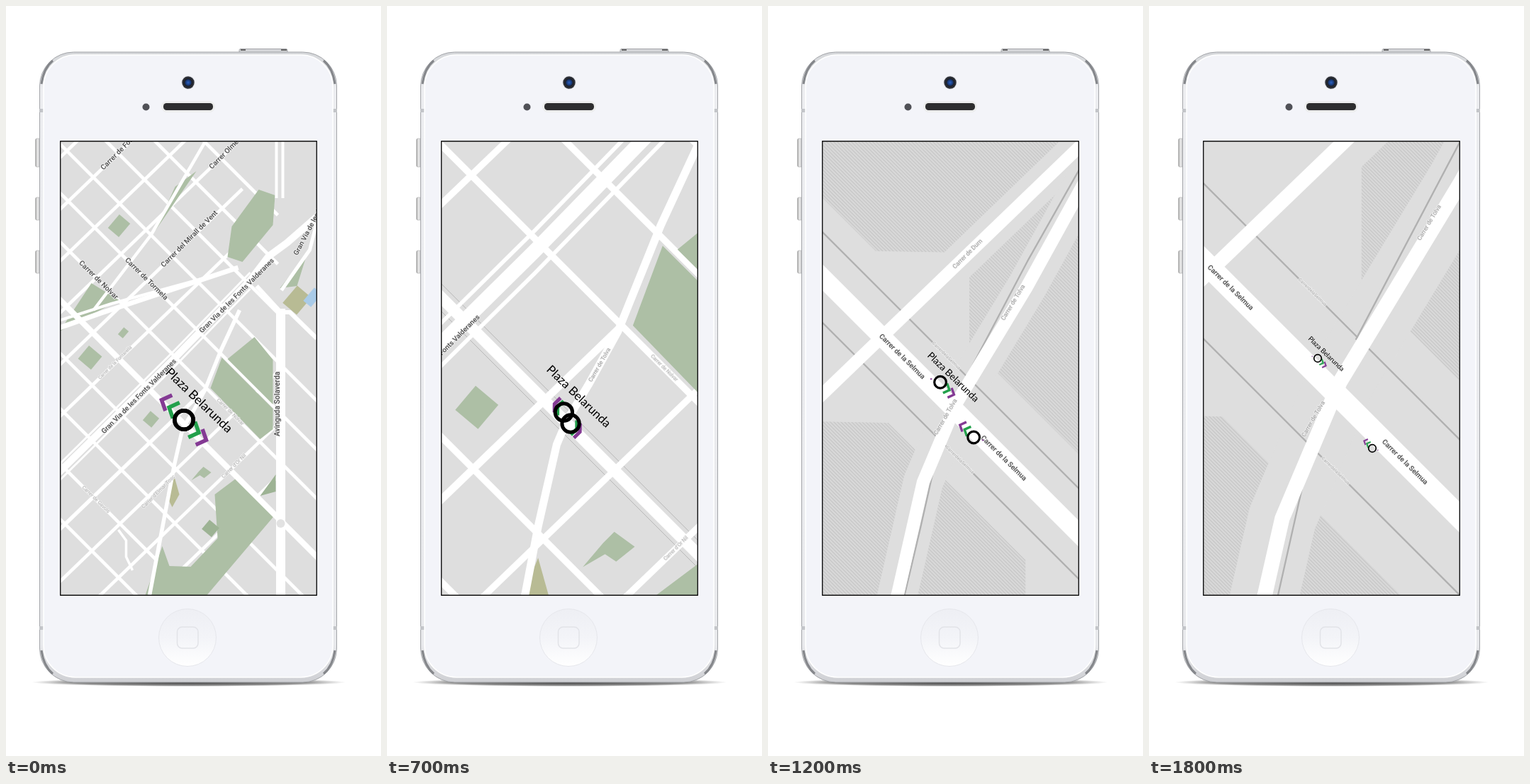
These frames come from a looping animation (529 by 1058 pixels, 1900 ms). An HTML page with a canvas:

```html
<!DOCTYPE html>
<html lang="ca">
<head>
<meta charset="utf-8">
<title>Map zoom</title>
<style>
html, body { margin: 0; width: 100%; height: 100%; overflow: hidden; background: #fff; }
svg, canvas { position: absolute; left: 0; top: 0; }
canvas { left: 76px; top: 190px; }
</style>
</head>
<body>
<svg width="529" height="1058" viewBox="0 0 529 1058">
  <defs>
    <linearGradient id="rim" x2="0" y2="1">
      <stop offset="0" stop-color="#d4d6d9"/><stop offset=".06" stop-color="#ecedf0"/>
      <stop offset=".94" stop-color="#e8e9ec"/><stop offset="1" stop-color="#cfd0d4"/>
    </linearGradient>
    <linearGradient id="key">
      <stop offset="0" stop-color="#999"/><stop offset=".4" stop-color="#eee"/><stop offset="1" stop-color="#b5b5b8"/>
    </linearGradient>
    <linearGradient id="home" x2="0" y2="1">
      <stop offset="0" stop-color="#eeeff4"/><stop offset=".5" stop-color="#f3f4f8"/><stop offset="1" stop-color="#fff"/>
    </linearGradient>
    <radialGradient id="shade">
      <stop offset="0" stop-color="#222" stop-opacity=".9"/><stop offset=".75" stop-color="#333" stop-opacity=".55"/>
      <stop offset="1" stop-color="#555" stop-opacity="0"/>
    </radialGradient>
    <radialGradient id="lens">
      <stop offset="0" stop-color="#2b62c4"/><stop offset=".45" stop-color="#17356f"/>
      <stop offset=".6" stop-color="#1d2029"/><stop offset="1" stop-color="#33363d"/>
    </radialGradient>
  </defs>
  <ellipse cx="258" cy="954" rx="222" ry="6" fill="url(#shade)"/>
  <rect x="329" y="60.500" width="68" height="8" rx="2" fill="#d5d6d9" stroke="#a5a6aa"/>
  <path d="M331 62H338M388 62H396" stroke="#666" stroke-width="2"/>
  <g fill="url(#key)" stroke="#aaa" stroke-width=".6">
    <rect x="41.500" y="187" width="7" height="40" rx="2"/>
    <rect x="41.500" y="270" width="7" height="32" rx="2"/>
    <rect x="41.500" y="345" width="7" height="32" rx="2"/>
  </g>
  <rect x="47.500" y="65" width="419" height="889" rx="48" fill="url(#rim)" stroke="#a3a5a9"/>
  <g fill="none" stroke="#85878b" stroke-width="3">
    <path d="M50 110Q53 88 66 77M464 110Q461 88 448 77M50 909Q53 931 66 942M464 909Q461 931 448 942"/>
  </g>
  <path d="M47 145h7v5h-7zM460 145h7v5h-7zM47 875h7v5h-7zM460 875h7v5h-7z" fill="#c3c5c9"/>
  <rect x="53" y="69" width="408" height="878" rx="45" fill="#f3f4f9" stroke="#fff" stroke-width="1.500"/>
  <circle cx="257" cy="108" r="10" fill="#e8e9ee"/>
  <circle cx="257" cy="108" r="8.700" fill="url(#lens)"/>
  <circle cx="197.500" cy="142.500" r="5" fill="#505157"/>
  <rect x="219" y="134" width="76" height="16" rx="8" fill="#eceded"/>
  <rect x="222" y="137" width="70" height="10" rx="4.500" fill="#2d2d2f"/>
  <circle cx="256" cy="891" r="40.500" fill="url(#home)" stroke="#e6e7ec"/>
  <rect x="241.500" y="876" width="29.500" height="30" rx="7" fill="none" stroke="#e2e3e8" stroke-width="1.500"/>
</svg>
<canvas width="363" height="642"></canvas>
<script>
const g = document.querySelector('canvas').getContext('2d');
const BASE = '#dedede', GREEN = '#adbfa5', OLIVE = '#b8bb94', DEEP = '#9db394', PURPLE = '#843a94';
const SLOPE = .963, MID = 254;

// Street grid: height of the k-th street at x = MID, in both directions
const down = k => k > 0 ? 589 + 78 * k : k < 0 ? 579 + 69 * k : 592;
const up = k => k < 0 ? 556 + 73 * k : 569 + 74 * k;
const onDown = (a, x) => a + x - MID;
const onUp = (b, x) => b - SLOPE * (x - MID);
const cross = (a, b) => {
  const x = MID + (b - a) / (1 + SLOPE);
  return [x, onDown(a, x)];
};

const RIBBON = [331, 430, 305, 486, 282, 543, 266, 572, 254.5, 591, 249, 604, 239, 648, 204, 832];
const PARKS = [
  [GREEN, 290, 540, 306, 497, 378, 569, 378, 598, 360, 612],
  [GREEN, 314, 499, 352, 468, 378, 500, 378, 563],
  [GREEN, 77, 460, 122, 392, 161, 416],
  [GREEN, 212, 318, 240, 256, 270, 234],
  [GREEN, 314, 355, 320, 312, 358, 260, 381, 268, 378, 310, 335, 362],
  [GREEN, 296, 690, 328, 666, 380, 720, 285, 832, 198, 832, 222, 763, 232, 791, 262, 792, 300, 752],
  [GREEN, 263, 670, 274, 657, 280, 651, 291, 659, 281, 667, 275, 663],
  [GREEN, 440, 306, 430, 345, 388, 399, 412, 396],
  [DEEP, 360, 692, 382, 662, 382, 686],
  [OLIVE, 228, 692, 239, 665, 246, 690, 236, 708]
];
// Small square gardens: colour, centre, sides
const GARDENS = [
  [GREEN, 206, 584, 16, 17], [GREEN, 161, 311, 20, 25], [GREEN, 120, 497, 24, 24],
  [GREEN, 167, 462, 9, 13], [DEEP, 290, 738, 18, 17], [OLIVE, 412, 416, 26, 32], ['#a9cbe8', 434, 412, 14, 24]
];

const clamp = (v, lo, hi) => Math.min(hi, Math.max(lo, v));
const ramp = (t, from, to) => clamp((t - from) / (to - from), 0, 1);
const smooth = u => u * u * (3 - 2 * u);

function draw(t) {
  const zoom = t / 900 + 1.74 * smooth(ramp(t, 500, 1000)) + .15 * ramp(t, 1000, 1800);
  const scale = 2 ** zoom, wide = 1 + .735 * zoom;
  const late = ramp(t, 600, 1800);
  const cx = 252.5 + 9.5 * ramp(t, 800, 1200), cy = 591 - 46 * late;
  const toX = x => cx + (x - MID) * scale, toY = y => cy + (y - 592) * scale;

  function trace(p) {
    for (let i = 0; i < p.length; i += 2) g[i ? 'lineTo' : 'moveTo'](toX(p[i]), toY(p[i + 1]));
  }
  function stroke(width, ...p) {
    g.lineWidth = width;
    g.beginPath();
    trace(p);
    g.stroke();
  }
  const road = (w, ...p) => stroke(w * wide, ...p);
  const downLine = (a, end = 460) => [60, onDown(a, 60), end, onDown(a, end)];
  const upLine = (b, end) => [60, onUp(b, 60), end, onUp(b, end)];

  function put(text, x, y, angle, lo, hi, size = 10) {
    if (zoom < lo || zoom >= hi) return;
    g.save();
    g.translate(toX(x), toY(y));
    g.rotate(angle * Math.PI / 180);
    g.font = `${size < 9 ? 400 : 500} ${size}px Roboto, sans-serif`;
    g.textBaseline = 'middle';
    g.strokeStyle = 'rgba(240,240,240,.8)';
    g.lineWidth = 2;
    g.strokeText(text, 0, 0);
    g.fillStyle = size < 8 ? '#b0b0b0' : size < 9 ? '#999' : '#4a4a4a';
    g.fillText(text, 0, 0);
    g.restore();
  }
  const putDown = (text, a, x, ...rest) => put(text, x, onDown(a, x), 44.5, ...rest);
  const putUp = (text, b, x, ...rest) => put(text, x, onUp(b, x), -45, ...rest);

  g.setTransform(1, 0, 0, 1, -76, -190);
  g.lineJoin = 'round';
  g.fillStyle = BASE;
  g.fillRect(76, 190, 363, 642);

  if (t > 700) {
    blocks(trace);
    g.strokeStyle = BASE;
    stroke(6.5 * scale, ...RIBBON);
  }
  if (t >= 700) {
    g.strokeStyle = '#b0b0b0';
    const thin = Math.min(2.3, scale / 3);
    for (const side of [-7.4, 7.4]) stroke(thin, ...downLine(592 + side));
    if (t > 700) {
      stroke(thin, 279, 545, 266, 568, 256, 587);
      stroke(thin, 251.5, 598.4, 248.6, 611.3, 243, 635);
    }
  }

  g.strokeStyle = '#fff';
  for (let k = -6; k <= 4; k++) if (k) road(4.7, ...downLine(down(k), k < -3 ? 385 : 460));
  for (let k = -7; k <= 3; k++) {
    if (k !== -1) road(k ? 4.6 : 5.3, ...upLine(up(k), k > 0 ? 388 : k ? 335 : 284));
  }

  for (const [color, ...p] of PARKS) {
    g.fillStyle = color;
    g.beginPath();
    trace(p);
    g.fill();
  }
  for (const [color, x, y, w, h] of GARDENS) {
    g.save();
    g.translate(toX(x), toY(y));
    g.rotate(.7);
    g.scale(scale, scale);
    g.fillStyle = color;
    g.fillRect(-w / 2, -h / 2, w, h);
    g.restore();
  }

  road(8, ...downLine(592));
  road(10, 60, 675, 237, 500, 346, 388, 372, 354, 398, 335, 445, 294);
  for (const dy of [-11, 12]) road(2.8, 60, 675 + dy, 237, 500 + dy, 346, 388 + dy);
  road(5.5, ...RIBBON);
  road(7, 60, 461, 136, 434, 329, 370);
  road(4, 60, 450, 150, 421, 310, 377);
  road(4.5, 125, 430, 206, 324, 285, 188);
  road(13, 389, 428, 389, 840);
  for (const x of [383, 392]) road(4, x, 188, x, 272);
  road(6, 355, 396, 389, 433, 402, 433, 440, 470);
  road(5, 440, 306, 430, 345, 390, 402);
  road(3.5, 160, 740, 171, 755, 171, 778, 180, 797);
  g.fillStyle = '#e2e2e2';
  g.beginPath();
  g.arc(toX(389), toY(731), 6 * scale, 0, 7);
  g.fill();

  const boulevard = 'Gran Via de les Fonts Valderanes', marked = 'Carrer de la Selmua', tiny = 'CarrerdelaSelmua',
    ribbon = 'Carrer de Tolva', lane = 'Carrer de Nolvar';
  putUp('Carrer de Foscaner', up(-6), 137, 0, .3);
  putUp('Carrer Olmera', up(-4), 290, 0, .3);
  putUp('Carrer del Mirall de Vent', up(-3), 222, 0, 1);
  putUp('Carrer de la Fontarella', up(-2), 133, 0, 1, 6.5);
  putUp("Carrer d'Elmar Tosc", 651, 194, 0, 1.7, 7.3);
  putUp("Carrer d'Or Nil", up(2), 307, 0, 1.7, 7.3);
  putUp(boulevard, 491, 138, 0, .3, 9.8);
  putUp(boulevard, 491, 153, .3, 1, 9.8);
  putUp(boulevard, 491, 168, 1, 1.7, 9.8);
  putUp(boulevard, 482, 276, 0, 1, 9.8);
  putUp(boulevard, 480, 241.5, 1.7, 2.4, 9.8);
  putUp('Carrer de Durn', up(0), 269.5, 2.4, 3.1, 8.6);
  putUp('Carrer de Durn', up(0), 254, 3.1, 3.6, 8.6);
  putDown('Carrer de Tormela', down(-2), 171, 0, 1);
  putDown(lane, down(-1), 106, 0, 1);
  putDown(lane, down(-1), 300, 0, 1.7, 7);
  putDown(lane, down(-1), 274.5, 1.7, 2.4, 8);
  putDown('Carrer de Vilmonya', down(1), 202.5, 1.7, 2.4);
  putDown('Carrer de Gavols', down(3), 110, 0, 1, 7);
  putDown(marked, 592, 227, 1.7, 2.4);
  putDown(marked, 592, 242, 2.4, 5, 9.8);
  putDown(marked, 592, 258.6, 3.1, 5, 9.8);
  putDown(tiny, 584.6, 250.6, 3.1, 5, 6.7);
  putDown(tiny, 599.4, 252.8, 2.4, 5, 6.7);
  put(boulevard, 410, 352, -62, 0, .3, 9.8);
  put('Avinguda Solaverda', 384, 608, -90, 0, .3, 10.3);
  put(ribbon, 267, 570, -60, .3, 1.7, 8);
  put(ribbon, 249, 606, -77, 1.7, 2.4, 8);
  put(ribbon, 262, 577.5, -59, 2.4, 5, 8.5);
  put(ribbon, 243, 629, -79, 2.4, 3.1, 8.4);
  put(ribbon, 251, 596.2, -60, 3.1, 5, 8.5);

  marker(t);
  g.save();
  g.translate(224, 518 - 48 * late);
  g.rotate(.765);
  g.font = `400 ${17.6 - 8.1 * late}px Lato, sans-serif`;
  g.fillStyle = '#000';
  g.fillText('Plaza Belarunda', 0, 0);
  g.restore();

  g.lineWidth = 1.4;
  g.strokeStyle = '#111';
  g.strokeRect(76.7, 190.7, 361.6, 640.6);
}

// Hatched city blocks with cut corners, one per cell of the grid
function blocks(trace) {
  const cut = 11;
  g.save();
  g.beginPath();
  for (let i = -4; i < 4; i++) {
    for (let j = -4; j < 3; j++) {
      const a0 = down(i) + (i ? 4 : 13), a1 = down(i + 1) - (i + 1 ? 4 : 13);
      const b0 = up(j) + (j === -1 ? 12 : 4), b1 = up(j + 1) - (j === -2 ? 14 : 4);
      trace([
        [a0 + cut, b0], [a1 - cut, b0], [a1, b0 + cut], [a1, b1 - cut],
        [a1 - cut, b1], [a0 + cut, b1], [a0, b1 - cut], [a0, b0 + cut]
      ].flatMap(([a, b]) => cross(a, b)));
      g.closePath();
    }
  }
  g.fillStyle = '#d8d8d8';
  g.fill();
  g.clip();
  g.beginPath();
  for (let y = -180; y < 840; y += 5) {
    g.moveTo(76, y);
    g.lineTo(440, y + 364);
  }
  g.strokeStyle = '#c6c6c6';
  g.lineWidth = 1.2;
  g.stroke();
  g.restore();
}

// Two rings drifting apart while their arrows turn inwards
function marker(t) {
  const p = ramp(t, 570, 1600), size = 1 - .63 * p;
  const face = clamp((t - 790) / 200, -1, 1);
  const rings = [[251 - 13 * p, 584 - 87 * p, 1], [251 + 64 * p, 584 + 40 * p, -1]];
  for (const [x, y, dir] of rings) {
    g.save();
    g.translate(x, y);
    g.scale(size, size);
    chevron('#22a04b', 15.5, dir * face);
    chevron(PURPLE, 26, dir * face);
    if (t >= 800) {
      g.fillStyle = PURPLE;
      g.fillRect(-21 * dir - 2, -7 * dir - 2, 4, 3);
    }
    g.restore();
  }
  g.strokeStyle = '#000';
  g.lineWidth = 5.5 - 3.8 * p;
  for (const [x, y] of rings) {
    g.beginPath();
    g.arc(x, y, 13.2 - 7.9 * p, 0, 7);
    g.stroke();
  }
}

function chevron(color, distance, face) {
  g.save();
  g.translate(distance * face, distance * face);
  g.rotate(.4);
  g.beginPath();
  g.moveTo(-5 * face, -12);
  g.lineTo(6 * face, 0);
  g.lineTo(-5 * face, 12);
  g.strokeStyle = color;
  g.lineJoin = 'miter';
  g.lineWidth = 5.5;
  g.stroke();
  g.restore();
}

function tick() {
  draw(Math.floor(performance.now() % 1900 / 100) * 100);
  requestAnimationFrame(tick);
}
tick();
</script>
</body>
</html>
```
